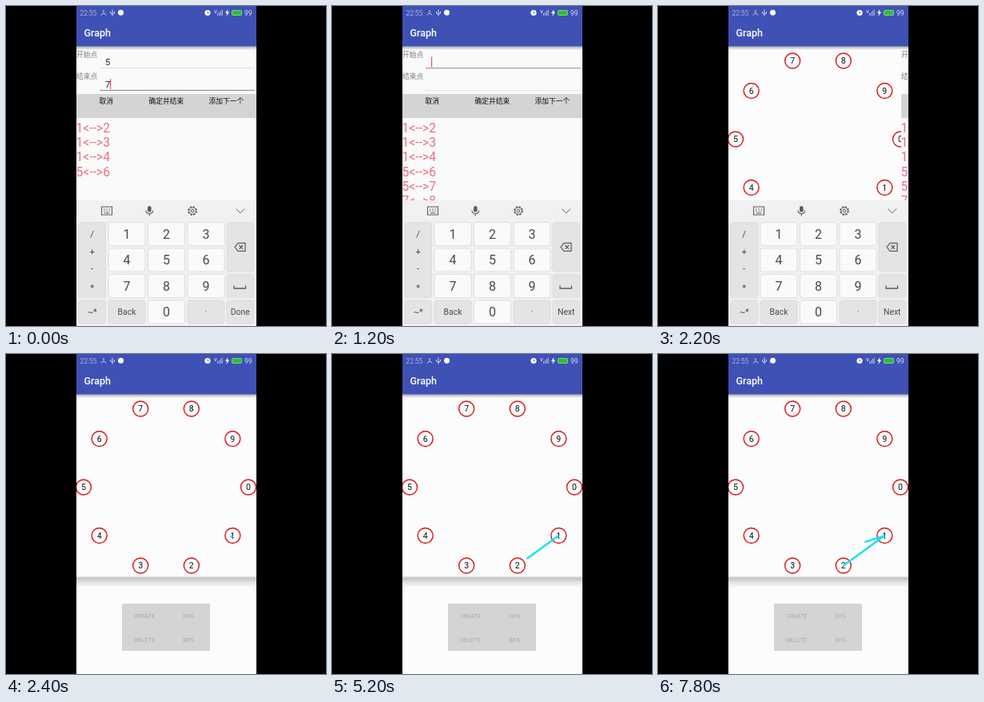
Animation of 400 by 400 pixels, one loop 8 s. Source, as an HTML page:

```html
<!DOCTYPE html>
<html lang="zh">
<head>
<meta charset="utf-8">
<title>Graph</title>
<style>
  html, body { margin: 0; width: 100%; height: 100%; overflow: hidden; background: #000; }
  svg { display: block; width: 100vw; height: 100vh; }
  text { font-family: Roboto, "Noto Sans CJK SC", "Noto Sans CJK", sans-serif; }
</style>
</head>
<body>
<svg id="stage" viewBox="0 0 400 400"></svg>
<script>
const LOOP = 8000, STEP = 200;
const stage = document.getElementById('stage');

const rect = (x, y, w, h, fill, extra = '') =>
  `<rect x="${x}" y="${y}" width="${w}" height="${h}" fill="${fill}" ${extra}/>`;
const text = (x, y, size, fill, str, extra = '') =>
  `<text x="${x}" y="${y}" font-size="${size}" fill="${fill}" ${extra}>${str.replace(/</g, '&lt;')}</text>`;
const centered = (x, y, size, fill, str, extra = '') =>
  text(x, y, size, fill, str, 'text-anchor="middle" ' + extra);
const path = (d, stroke, width = 1, extra = '') =>
  `<path d="${d}" fill="none" stroke="${stroke}" stroke-width="${width}" ${extra}/>`;

const DEFS = `<defs>
  <linearGradient id="shade" x2="0" y2="1">
    <stop offset="0" stop-color="#000" stop-opacity=".32"/>
    <stop offset="1" stop-color="#000" stop-opacity="0"/>
  </linearGradient>
  <clipPath id="screen"><rect x="88" width="225" height="400"/></clipPath>
</defs>`;

function appBar() {
  const pale = '#d5daf2';
  return rect(88, 0, 225, 50.5, '#3f51b5') + rect(88, 50.5, 225, 4.5, 'url(#shade)')
    + text(92.5, 11.5, 8.6, pale, '22:55', 'font-weight="300"')
    + path('M119 11.5q3-5 6 0M122 8v-3M133 12.5v-8M130.5 7v2l2.5 1.5 2.5-1.5v-2', pale)
    + `<circle cx="143.5" cy="8.3" r="3.5" fill="#fff"/><circle cx="252" cy="8.5" r="3.6" fill="#fff"/>`
    + path('M252 6.3v2.4h1.8', '#3f51b5', .8)
    + path('M260.5 5l1.5 4 1.5-4M264.5 12V9M266.5 12V7.5M268.5 12V6M270.3 12V4.5', pale, .8)
    + '<path d="M277.5 4l-3.5 5h2.2l-.8 4 3.8-5.4h-2.3z" fill="#fff"/>'
    + rect(282.5, 5.5, 12, 6, '#22c51e', 'rx="1" stroke="#a9d7b4" stroke-width=".8"')
    + text(298, 11.5, 8.6, pale, '99')
    + text(97.5, 38.3, 12.5, '#fff', 'Graph', 'font-weight="500"');
}

function inputRow(label, value, top, focused, cursor) {
  return text(88, top + 13, 8.75, '#7c7c7c', label)
    + text(124, top + 23.5, 11.25, '#222', value)
    + rect(117, top + 26.7, 193.5, focused ? 1 : .8, focused ? '#858585' : '#dadada')
    + (cursor ? rect(124 + value.length * 6, top + 40 - 27, 1.2, 13, '#ff4081') : '');
}

function form(s) {
  const links = ['1<-->2', '1<-->3', '1<-->4', '5<-->6', '5<-->7', '7<-->8'];
  return rect(88, 50, 225, 350, '#fafafa')
    + inputRow('开始点', s.start, 50.5, s.focus === 0, s.cursor && s.focus === 0)
    + inputRow('结束点', s.end, 78.2, s.focus === 1, s.cursor && s.focus === 1)
    + rect(88, 110, 225, 30, '#d4d4d4')
    + (s.confirm ? rect(163, 110, 75, 30, '#c9c9c9') : '')
    + ['取消', '确定并结束', '添加下一个'].map((label, i) =>
        centered(125.3 + i * 75, 122.2, 8.75, '#111', label, 'font-weight="500"')).join('')
    + links.slice(0, s.links).map((label, i) =>
        text(87.5, 157.6 + i * 18.3, 15.7, '#ec6f82', label)).join('');
}

function key(x, y, w, h, label, { fill = '#e4e4e4', size = 10.4 } = {}) {
  return rect(x, y, w, h, fill, 'rx="3" stroke="#d9d9d9" stroke-width=".8"')
    + centered(x + w / 2, y + h / 2 + size * .355, size, '#4a4a4a', label);
}

function keyboard(s) {
  const ink = '#5c5c5c', columns = [128, 177.5, 227], rows = [270.5, 303, 335.5];
  let out = rect(88, 243, 225, 157, '#f1f1f1')
    + path('M119.5 251h13v10h-13zM122 254h1.5M125.3 254h1.5M128.6 254h1.5M122 256.3h1.5M125.3 256.3h1.5M128.6 256.3h1.5M123 258.8h6', ink, 1.1)
    + rect(177, 250, 4.6, 7.5, ink, 'rx="2.3"')
    + path('M175 255.5q0 4 4.3 4t4.3-4M179.3 259.5v3', ink, 1.1)
    + `<circle cx="233" cy="256" r="5" fill="none" stroke="${ink}" stroke-width="1.7" stroke-dasharray="2.3 1.63"/>`
    + `<circle cx="233" cy="256" r="4.2" fill="none" stroke="${ink}" stroke-width=".8"/>`
    + `<circle cx="233" cy="256" r="1.8" fill="none" stroke="${ink}"/>`
    + path('M287.5 253.5l5.3 5.3 5.3-5.3', ink);
  for (let n = 1; n <= 9; n++)
    out += key(columns[(n - 1) % 3], rows[Math.floor((n - 1) / 3)], 46, 29, String(n),
      { fill: s.pressed === n ? '#cbcbcb' : '#fafafa', size: 16 });
  out += key(91, 270.5, 33.5, 94, '') + key(276, 270.5, 33.5, 61.5, '') + key(276, 335.5, 33.5, 29, '')
    + key(91, 368, 33.5, 29, '~*', { size: 11 }) + key(128, 368, 46, 29, 'Back')
    + key(177.5, 368, 46, 29, '0', { fill: '#fafafa', size: 16 })
    + key(227, 368, 46, 29, '·') + key(276, 368, 33.5, 29, s.focus === 1 ? 'Done' : 'Next');
  out += ['/', '+', '-', '*'].map((c, i) =>
    centered(107.7, 289 + i * 21.7 + (c === '*' ? 2 : 0), 11.5, '#4a4a4a', c)).join('');
  return out + path('M286 301.3l4-5h9v10h-9zM291.5 299l4.6 4.6M296.1 299l-4.6 4.6', ink, 1.2)
    + path('M285 349.5v3.5h14.5v-3.5', ink, 1.3);
}

const node = i => {
  const angle = i * Math.PI / 5;
  return { x: 200 + 103 * Math.cos(angle), y: 166.5 + 103 * Math.sin(angle) };
};

// Edges grow at constant speed, one after the other.
const SPEED = 64 / 3900;
function edge(from, to, elapsed) {
  const a = node(from), b = node(to);
  const part = Math.min(1, elapsed * SPEED / Math.hypot(b.x - a.x, b.y - a.y));
  if (part <= 0) return '';
  return path(`M${a.x} ${a.y}L${a.x + (b.x - a.x) * part} ${a.y + (b.y - a.y) * part}`, '#12e4ee', 2.4);
}

function graph(t) {
  let out = rect(88, 50, 225, 350, '#fcfcfc')
    + rect(88, 278.5, 225, 4.5, '#cbcbcb') + rect(88, 283, 225, 9, 'url(#shade)', 'opacity=".45"')
    + rect(145, 312, 110, 59, '#d4d4d4');
  [['CREATE', 173, 330], ['DFS', 228, 330], ['DELETE', 173, 359.5], ['BFS', 228, 359.5]]
    .forEach(([label, x, y]) => out += centered(x, y, 7.5, '#a9a9a9', label));
  for (let i = 0; i < 10; i++) {
    const { x, y } = node(i);
    out += `<circle cx="${x}" cy="${y}" r="9.5" fill="#fdfdfd" stroke="#d8161a" stroke-width="1.4"/>`
      + centered(x, y + 3.7, 10.6, '#111', String(i));
  }
  return out + edge(1, 2, t - 2200) + edge(1, 3, t - 6200);
}

function formState(t) {
  const s = { start: '', end: '', focus: 0, cursor: true, links: 5, pressed: 0, confirm: false };
  if (t < 200) return { ...s, start: '5', end: '7', focus: 1, links: 4 };
  if (t < 400) return s;
  if (t < 800) return { ...s, start: '7', focus: 1 };
  if (t < 1000) return { ...s, start: '7', focus: 1, pressed: 8 };
  if (t < 1200) return { ...s, start: '7', end: '8', focus: 1 };
  return { ...s, links: 6, cursor: t < 1600, confirm: t >= 1800 };
}

function scene(t) {
  const s = formState(t);
  let body = '';
  if (t >= 2200) body += graph(t);
  if (t < 2200) body += form(s);
  else if (t < 2400) body += `<g transform="translate(216)">${form(s)}</g>`;
  if (t < 2400) body += keyboard(s);
  return DEFS + rect(0, 0, 400, 400, '#000') + `<g clip-path="url(#screen)">${body}${appBar()}</g>`;
}

let shown = -1;
function tick() {
  const t = Math.floor(performance.now() % LOOP / STEP) * STEP;
  if (t !== shown) stage.innerHTML = scene(shown = t);
  requestAnimationFrame(tick);
}
tick();
</script>
</body>
</html>
```
